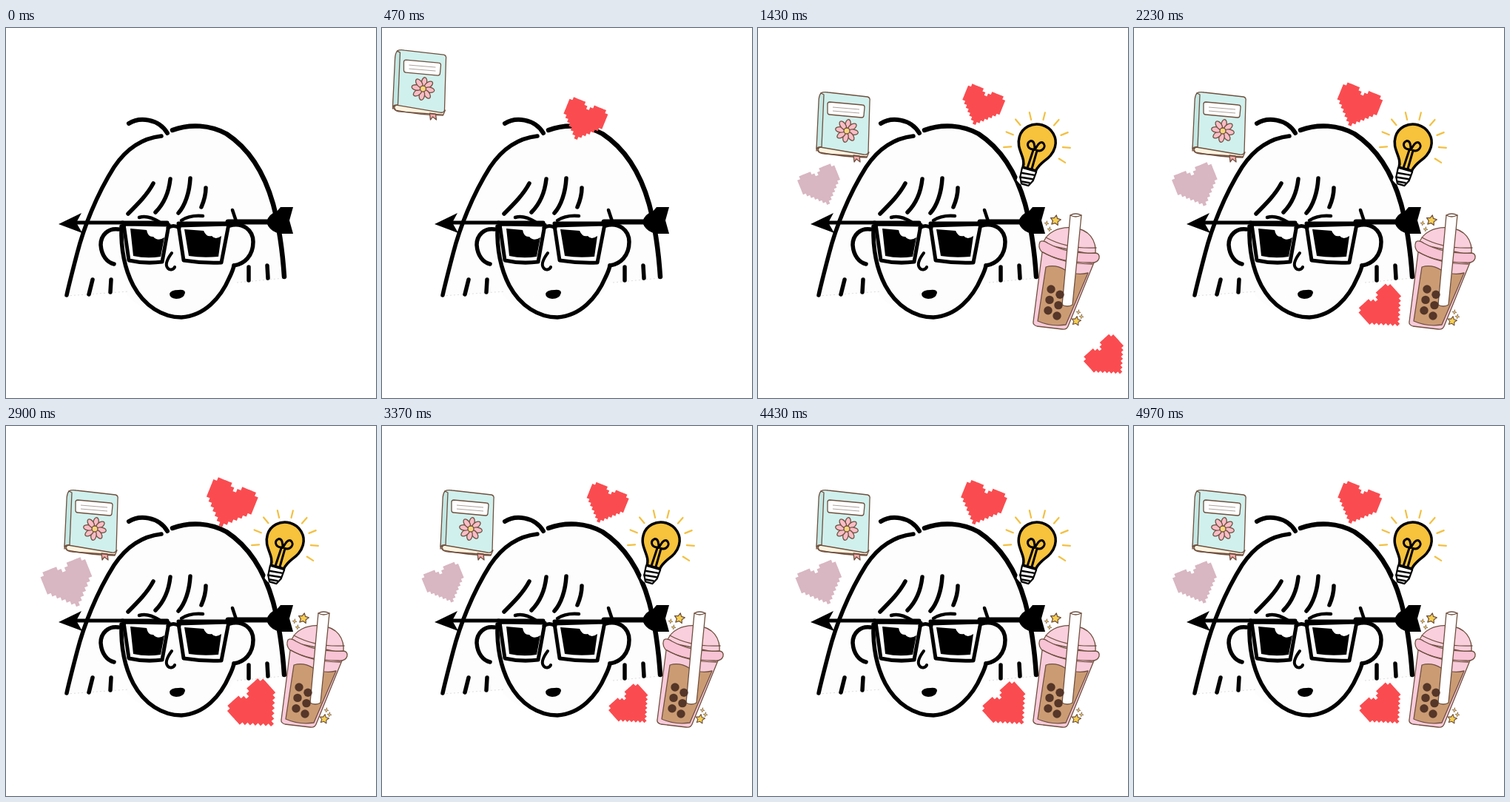
Animation, 500 px wide and 500 px high, one loop 5010 ms. Source, as an HTML page:

```html
<!DOCTYPE html>
<html lang="en">
<head>
<meta charset="utf-8">
<title>Portrait with hearts</title>
<style>
html, body { margin: 0; width: 100%; height: 100%; overflow: hidden; background: #fff; }
svg { display: block; width: 100%; height: 100%; }
.ink { fill: none; stroke: #000; stroke-linecap: round; stroke-linejoin: round; }
.brown { stroke: #70503f; stroke-width: 1.3; stroke-linecap: round; stroke-linejoin: round; }
.part { visibility: hidden; }
</style>
</head>
<body>
<svg viewBox="0 0 500 500">
  <g id="face">
    <path fill="#fdfdfd" d="M211 146C180 150 160 165 146 188C110 250 95 305 82 362L160 356C190 400 280 400 308 344L376 338C376 270 350 180 298 143C275 130 250 130 225 138Z"/>
    <path d="M82 362L166 356M312 344L376 338" stroke="#ddd" stroke-dasharray="2 3"/>
    <g class="ink" stroke-width="5.5">
      <path d="M210 146C183 149 162 164 146 188C122 226 105 270 96 305C90 328 85 347 82 361"/>
      <path stroke-width="6.5" d="M225 138C249 129 276 131 298 143C330 164 350 199 361 238C370 272 374 306 376 336"/>
      <path stroke-width="6" d="M166 129C180 120 206 122 218 142"/>
      <path d="M117 340L112 360M142 340L141 357M328 323L328 341M353 321L354 338"/>
      <path d="M199 210C191 225 179 237 165 251M222 204C220 222 213 238 202 249M249 203C248 222 242 240 233 250M270 216C270 226 267 235 264 242"/>
      <path d="M180 256C189 253 199 257 207 262M237 260C246 254 255 253 266 254M306 246L311 261" stroke-width="4.5"/>
      <path d="M156 268C155 300 160 325 172 348C187 376 212 391 237 391C268 389 290 365 302 337C305 331 307 326 308 321"/>
      <path d="M152 272C138 270 128 280 128 293C129 308 137 317 146 319M302 267C320 262 334 273 334 289C334 308 322 319 308 321"/>
      <path stroke-width="4" d="M224 304C218 312 214 320 219 325C222 328 227 326 228 323"/>
      <path d="M92 263H158" stroke-width="5"/>
      <path d="M300 262H360" stroke-width="7"/>
    </g>
    <path d="M71 265L102 250L95 263L103 277Z"/>
    <path d="M352 262Q355 251 366 248L371 242H388L383 260L388 278H370Q355 274 352 262Z"/>
    <path d="M221 359Q223 354 233 354Q242 353 242 358Q240 366 230 366Q221 365 221 359Z"/>
    <g class="ink" stroke-width="5">
      <path fill="#fff" d="M159 265L220 266L211 316Q188 319 166 314Z"/>
      <path fill="#fff" d="M233 267L301 265L291 317Q265 318 240 314Z"/>
      <path d="M157 263H218M219 270Q226 265 234 270M233 264H302"/>
    </g>
    <path d="M168 271L190 273Q192 283 199 282Q205 289 214 283L209 309Q190 312 172 308Z"/>
    <path d="M241 272L267 274Q271 283 278 281Q283 287 291 281L287 309Q265 311 247 308Z"/>
  </g>

  <g id="book" class="part">
    <path class="brown" fill="#fff3df" d="M81 164L84 160L150 168L147 175Q112 174 83 168Z"/>
    <path class="brown" fill="#f5a9ac" d="M129 172L137 173L138 181L133 177L130 181Z"/>
    <path class="brown" fill="#d0f0ed" d="M85 88Q88 86 95 87L148 93Q152 94 151 99L149 168Q148 172 143 171L84 161Q79 162 79 166Z"/>
    <path class="brown" fill="#c2e8e4" d="M85 88Q82 92 82 100L79 163Q82 160 86 161L89 90Z"/>
    <path class="brown" fill="none" d="M80 165Q83 170 90 170L147 174"/>
    <path class="brown" fill="#fff" d="M97 100L141 104Q144 104 144 107L143 118Q143 121 140 121L97 117Q94 117 94 114L94 103Q94 100 97 100Z"/>
    <path d="M101 107L137 110M101 112L137 115" stroke="#9b8a83" stroke-width=".8"/>
    <g id="flower" transform="translate(120 139)"></g>
  </g>

  <g id="bulb" class="part">
    <g id="rays" transform="translate(377 158)" stroke="#f3c042" stroke-width="2.2" stroke-linecap="round"></g>
    <g transform="translate(377 155) rotate(16)">
      <path fill="#fff" stroke="#fff" stroke-width="5" d="M-10 36H10V55Q0 63 -10 55Z"/>
      <path fill="#f7c23c" stroke="#000" stroke-width="3.5" d="M-9 37C-9 22 -25 17 -25 -1A25 24 0 0 1 25 -1C25 17 11 22 9 37Z"/>
      <path class="ink" stroke-width="3" d="M-3 35L-2 10C-11 12 -14 4 -9 0C-4 -2 -2 5 0 10C1 4 3 -4 8 -2C14 1 11 10 3 10L3 35"/>
      <path fill="#fff" stroke="#000" stroke-width="2.2" stroke-linejoin="round" d="M-10 38H10L9 51L5 59H-5L-9 51Z"/>
      <path class="ink" stroke-width="2.4" d="M-9 45L9 43M-9 51L8 49M-5 56L5 55"/>
    </g>
  </g>

  <g id="cup" class="part">
    <path class="brown" fill="#f8cbdb" d="M384 303L372 397Q371 401 377 403L411 407Q417 408 419 403L454 317Z"/>
    <path class="brown" fill="#cb9c74" d="M389 323Q402 319 415 327Q430 335 446 331L416 401Q396 404 378 396Z"/>
    <path class="brown" fill="#f9cfdd" d="M385 292C389 276 407 268 426 270C447 272 458 286 456 307Z"/>
    <path class="brown" fill="#f7c3d5" d="M381 289Q385 286 392 291Q420 306 455 304Q462 304 461 311Q459 318 449 317Q408 317 383 302Q378 296 381 289Z"/>
    <path class="brown" fill="none" d="M389 283Q418 299 457 297M385 303Q412 319 452 319"/>
    <path class="brown" fill="#fff" d="M422 253Q429 249 437 253L425 374Q418 378 411 374Z"/>
    <path class="brown" fill="none" d="M422 253Q429 257 437 253"/>
    <g id="pearls" fill="#553628"></g>
    <g id="stars" fill="#f5cf52"></g>
  </g>

  <g id="mauve" class="part" fill="#d8b6c2"></g>
  <g id="top" class="part" fill="#fa4c50"></g>
  <g id="low" class="part" fill="#fa4c50"></g>
</svg>
<script>
const LOOP = 5010, BEAT = 900, PEAK = 170;
const el = id => document.getElementById(id);
const repeat = (n, make) => Array.from({ length: n }, (_, i) => make(i)).join('');

// Each part swings in from an offset, bent by a pull; hearts also have a place and a tilt.
const parts = {
  top: { at: [302, 105], tilt: 22, start: 0, time: 530, from: [-338, -141], pull: [-130, 105] },
  book: { start: 300, time: 340, from: [-160, -190], pull: [-50, -20] },
  bulb: { start: 550, time: 300, from: [165, -75], pull: [60, -10] },
  mauve: { at: [85, 213], tilt: -22, start: 730, time: 630, from: [-75, -215], pull: [-32, 177] },
  cup: { start: 1080, time: 330, from: [130, -14], pull: [40, 0] },
  low: { at: [338, 380], tilt: -42, start: 1350, time: 250, from: [204, 60], pull: [94, 88] }
};

// A heart knitted from square stitches, with stepped edges.
function stitches(cell) {
  let d = '';
  for (let x = -30; x <= 30; x += cell)
    for (let y = -25; y <= 30; y += cell) {
      const w = Math.abs(x);
      if (w + y < 33 && Math.abs(w - 17) - y < 36)
        d += `M${x - cell / 2} ${y - cell / 2}h${cell + .3}v${cell + .3}h${-cell - .3}z`;
    }
  return `<path d="${d}"/>`;
}

function star(x, y, r, points) {
  const dent = points > 4 ? .5 : .35;
  const d = repeat(points * 2, i => {
    const a = Math.PI * i / points - 1.4, q = i % 2 ? r * dent : r;
    return `${i ? 'L' : 'M'}${x + q * Math.cos(a)} ${y + q * Math.sin(a)}`;
  });
  return `<path class="brown" style="stroke-width:${r / 7 + .2}" d="${d}Z"/>`;
}

for (const id in parts) if (parts[id].at) el(id).innerHTML = stitches(5);

el('flower').innerHTML = repeat(8, i =>
  `<ellipse cy="-9" rx="3.6" ry="6.5" transform="rotate(${i * 45 + 10})" fill="#f8bdc6" class="brown"/>`) +
  '<circle r="4" fill="#f6d67b" class="brown"/>';

el('rays').innerHTML = repeat(9, i => `<path d="M35 0H45" transform="rotate(${i * 27 - 184})"/>`);

el('pearls').innerHTML = repeat(6, i =>
  `<circle cx="${396 - i + i % 2 * 13}" cy="${353 + 7.2 * i}" r="5.7"/>`);

el('stars').innerHTML = star(402, 260, 7.3, 5) + star(430, 396, 6.5, 5) +
  repeat(2, i => star(390 + 4 * i, 264 + 8 * i, 3, 4) + star(433 + 4 * i, 384 + 6 * i, 3, 4));

function draw(t) {
  const size = .905 + .095 * Math.cos((t - PEAK) / BEAT * 2 * Math.PI);
  for (const id in parts) {
    const { at, tilt, start, time, from, pull } = parts[id], node = el(id);
    node.style.visibility = t > start ? 'visible' : 'hidden';
    const u = Math.min(1, Math.max(0, (t - start) / time)), v = 1 - u;
    const [dx, dy] = from.map((f, k) => v * v * f + 2 * u * v * pull[k]);
    node.setAttribute('transform', at
      ? `translate(${at[0] + dx} ${at[1] + dy}) rotate(${tilt}) scale(${size})`
      : `translate(${dx} ${dy})`);
  }
}

const begin = performance.now();
function tick() {
  draw((performance.now() - begin) % LOOP);
  requestAnimationFrame(tick);
}
tick();
</script>
</body>
</html>
```
